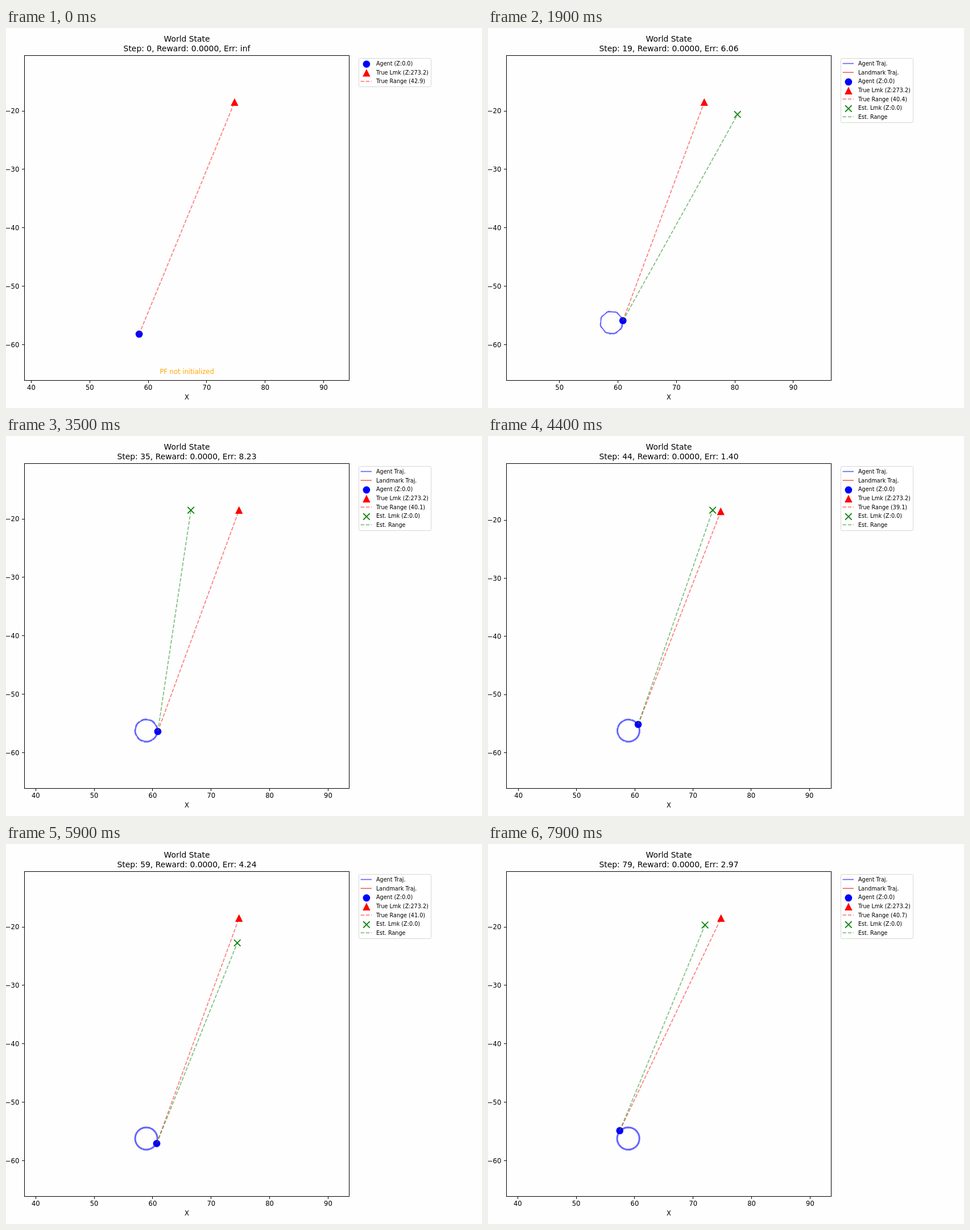
Animation of 837x669 px, one loop 8000 ms. Source, as an HTML page with a canvas:

```html
<!DOCTYPE html>
<html lang="en">
<head>
<meta charset="utf-8">
<title>World State</title>
<style>
html, body { margin: 0; width: 100%; height: 100%; overflow: hidden; background: #fefefe; }
canvas { display: block; }
</style>
</head>
<body>
<canvas id="stage" width="837" height="669"></canvas>
<script>
const ctx = document.getElementById('stage').getContext('2d');
const STEP_MS = 100, STEPS = 80;
const PT = 1.157; // pixels per point
const BOX = { l: 32.5, t: 48.5, w: 571, h: 572 };
const MID = { x: 318, y: 334.8 };
const LMK = { x: 74.76, y: -18.5 };
const BLUE = 'rgba(0,0,255,0.6)', RED = 'rgba(255,0,0,0.6)';
const RED_DASH = 'rgba(255,0,0,0.5)', GREEN_DASH = 'rgba(0,128,0,0.5)';
const DASH = [5.55 * PT, 2.4 * PT];
const rad = d => d * Math.PI / 180;
const dist = (a, b) => Math.hypot(a.x - b.x, a.y - b.y);

// The agent circles at a constant turn rate after its first move.
function agentAt(k) {
  if (k === 0) return { x: 58.45, y: -58.2 };
  const a = rad(-72 + 44.13 * (k - 9));
  return { x: 58.9 + 1.98 * Math.cos(a), y: -56.22 + 1.98 * Math.sin(a) };
}
const path = Array.from({ length: STEPS }, (_, k) => agentAt(k));

// step, estimate error, bearing of the estimate from the landmark, measured range
const keys = [
  [1, 22.8, -121, 42.5], [9, 20.74, 109.26, 42.6], [19, 6.06, -20.2, 40.4],
  [35, 8.23, 180, 40.1], [52, 5.14, 12.4, 39.3], [66, 10.96, -125.1, 42.5],
  [79, 2.97, -157.2, 40.7]
].map(([k, err, deg, range]) => ({
  k,
  x: LMK.x + err * Math.cos(rad(deg)),
  y: LMK.y + err * Math.sin(rad(deg)),
  bias: range - dist(path[k], LMK)
}));

function noise(n) {
  const s = Math.sin(n * 127.1 + 11.7) * 43758.5453;
  return 2 * (s - Math.floor(s)) - 1;
}

function estimateAt(k) {
  let i = 0;
  while (i < keys.length - 2 && k >= keys[i + 1].k) i++;
  const a = keys[i], b = keys[i + 1];
  const u = (k - a.k) / (b.k - a.k);
  const wob = 0.6 * Math.sin(Math.PI * u);
  const mix = p => a[p] + (b[p] - a[p]) * u;
  return { x: mix('x') + wob * noise(k), y: mix('y') + wob * noise(k + 100), bias: mix('bias') };
}

function text(s, x, y, size, align = 'left', color = '#000') {
  ctx.font = size + 'px "DejaVu Sans", sans-serif';
  ctx.textAlign = align;
  ctx.fillStyle = color;
  ctx.fillText(s, x, Math.round(y));
}

function line(pts, color, dash = [], width = 1.5 * PT) {
  ctx.strokeStyle = color;
  ctx.lineWidth = width;
  ctx.lineJoin = 'round';
  ctx.setLineDash(dash);
  ctx.beginPath();
  pts.forEach(p => ctx.lineTo(p.x, p.y));
  ctx.stroke();
  ctx.setLineDash([]);
}

function dot({ x, y }) {
  ctx.fillStyle = '#00f';
  ctx.beginPath();
  ctx.arc(x, y, 6.35, 0, 2 * Math.PI);
  ctx.fill();
}

function triangle({ x, y }) {
  const r = 5.78;
  ctx.beginPath();
  ctx.moveTo(x, y - r);
  ctx.lineTo(x - r, y + r);
  ctx.lineTo(x + r, y + r);
  ctx.closePath();
  ctx.fillStyle = ctx.strokeStyle = '#f00';
  ctx.lineWidth = PT;
  ctx.lineJoin = 'miter';
  ctx.fill();
  ctx.stroke();
}

function cross({ x, y }) {
  const r = 5.78;
  line([{ x: x - r, y: y - r }, { x: x + r, y: y + r }], '#008000');
  line([{ x: x - r, y: y + r }, { x: x + r, y: y - r }], '#008000');
}

function legend(range, full) {
  const stroke = (color, dash) => y => line([{ x: 623.6, y }, { x: 643, y }], color, dash);
  const mark = draw => y => draw({ x: 633.9, y: y + 1.1 });
  const rows = [
    [mark(dot), 'Agent (Z:0.0)'],
    [mark(triangle), 'True Lmk (Z:273.2)'],
    [stroke(RED_DASH, DASH), `True Range (${range.toFixed(1)})`]
  ];
  if (full) {
    rows.unshift([stroke(BLUE), 'Agent Traj.'], [stroke(RED), 'Landmark Traj.']);
    rows.push([mark(cross), 'Est. Lmk (Z:0.0)'], [stroke(GREEN_DASH, DASH), 'Est. Range']);
  }
  ctx.beginPath();
  ctx.roundRect(620.5, 53.5, 127, full ? 113 : 50, 2);
  ctx.fillStyle = '#fff';
  ctx.strokeStyle = '#d6d6d6';
  ctx.lineWidth = 1;
  ctx.fill();
  ctx.stroke();
  rows.forEach(([draw, label], i) => {
    const y = 62.5 + i * 15.65;
    draw(y);
    text(label, 651, y + 3.6, 9.64);
  });
}

function ticks(lo, hi, draw) {
  for (let v = Math.ceil(lo / 10) * 10; v <= hi; v += 10) {
    draw(v, String(v).replace('-', '\u2212'));
  }
}

function render(k) {
  const agent = path[k], est = k ? estimateAt(k) : null;
  const pts = path.slice(0, k + 1).concat(LMK, est || []);
  const bounds = p => {
    const v = pts.map(q => q[p]);
    return [Math.min(...v), Math.max(...v)];
  };
  const [x0, x1] = bounds('x'), [y0, y1] = bounds('y');
  const cx = (x0 + x1) / 2, cy = (y0 + y1) / 2;
  const half = 0.7 * Math.max(x1 - x0, y1 - y0);
  const scale = 285.75 / half;
  const map = p => ({ x: MID.x + (p.x - cx) * scale, y: MID.y - (p.y - cy) * scale });

  ctx.fillStyle = '#fefefe';
  ctx.fillRect(0, 0, 837, 669);

  const a = map(agent), l = map(LMK);
  dot(a);
  triangle(l);
  if (est) cross(map(est));
  if (k) line(path.slice(0, k + 1).map(map), BLUE);
  line([a, l], RED_DASH, DASH);
  if (est) line([a, map(est)], GREEN_DASH, DASH);
  else text('PF not initialized', MID.x, 609, 11.57, 'center', '#ffa500');

  const bottom = BOX.t + BOX.h;
  ctx.strokeStyle = '#000';
  ctx.lineWidth = 1;
  ctx.lineJoin = 'miter';
  ctx.strokeRect(BOX.l, BOX.t, BOX.w, BOX.h);
  ticks(cx - half, cx + half, (v, s) => {
    const x = map({ x: v, y: 0 }).x, px = Math.floor(x) + 0.5;
    line([{ x: px, y: bottom }, { x: px, y: bottom + 4.5 }], '#000', [], 1);
    text(s, x, 637, 11.57, 'center');
  });
  ticks(cy - half, cy + half, (v, s) => {
    const y = map({ x: 0, y: v }).y, py = Math.floor(y) + 0.5;
    line([{ x: BOX.l, y: py }, { x: BOX.l - 4.5, y: py }], '#000', [], 1);
    text(s, 23.3, y + 4.3, 11.57, 'right');
  });

  const err = est ? dist(est, LMK).toFixed(2) : 'inf';
  text('X', MID.x, 654, 11.57, 'center');
  text('World State', MID.x, 24, 13.89, 'center');
  text(`Step: ${k}, Reward: 0.0000, Err: ${err}`, MID.x, 41, 13.89, 'center');
  legend(dist(agent, LMK) + (est ? est.bias : 0), k > 0);
}

const start = performance.now();
function frame(now) {
  const t = Math.max(0, now - start) % (STEP_MS * STEPS);
  render(Math.floor(t / STEP_MS));
  requestAnimationFrame(frame);
}
render(0);
requestAnimationFrame(frame);
</script>
</body>
</html>
```
